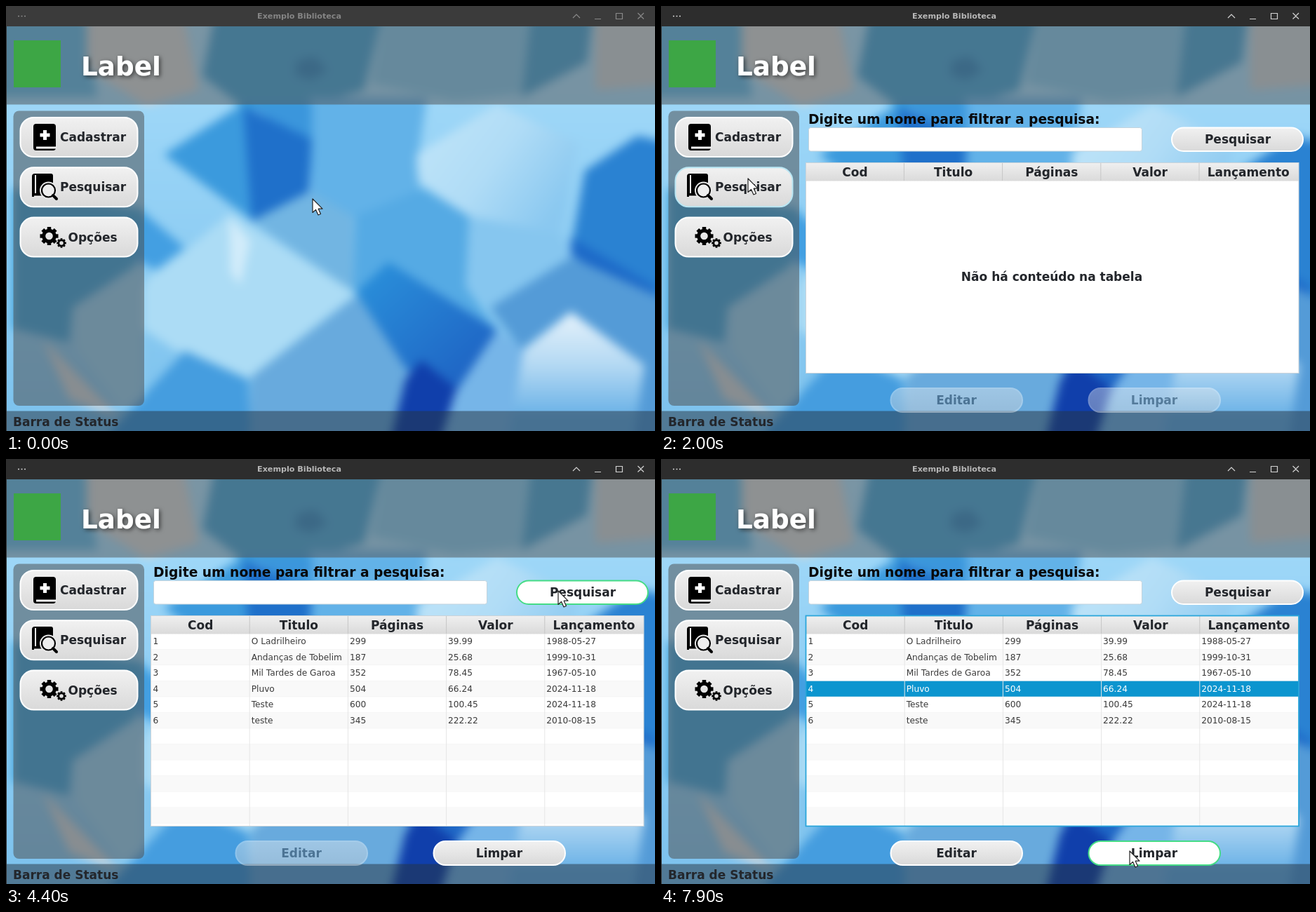
An HTML page for the animation above (8000 ms loop, 925 by 606 pixels).

```html
<!DOCTYPE html>
<html lang="pt">
<head>
<meta charset="utf-8">
<title>Exemplo Biblioteca</title>
<style>
html, body { margin: 0; width: 100%; height: 100%; overflow: hidden; background: #333; }
svg { display: block; width: 925px; height: 606px; }
text { font-family: "DejaVu Sans", sans-serif; fill: #23262b; }
.b { font-weight: bold; font-size: 17px; }
.mid { text-anchor: middle; }
.cell { font-size: 12.2px; fill: #3a3a3a; }
.btn rect { fill: url(#face); stroke: #fff; stroke-width: 2; }
.btn.focus rect { stroke: #b9e6f3; }
.btn.hover rect { fill: #fff; stroke: #45dc86; }
.btn.off { opacity: .4; }
.row.sel rect { fill: #0c95cf; }
.row.sel text { fill: #fff; }
</style>
</head>
<body>
<svg id="stage" viewBox="0 0 925 606">
  <defs>
    <linearGradient id="face" x2="0" y2="1"><stop stop-color="#f1f1f1"/><stop offset="1" stop-color="#d9d9d9"/></linearGradient>
    <linearGradient id="head" x2="0" y2="1"><stop stop-color="#efefef"/><stop offset="1" stop-color="#dadada"/></linearGradient>
    <linearGradient id="sky" x2="0" y2="1"><stop stop-color="#a9defb"/><stop offset="1" stop-color="#78bfec"/></linearGradient>
    <linearGradient id="deep" x2="1" y2="1"><stop stop-color="#2b93dc"/><stop offset="1" stop-color="#1c5cc0"/></linearGradient>
    <linearGradient id="pale" x2="0" y2="1"><stop stop-color="#e6f2fb"/><stop offset=".35" stop-color="#b4d9f3"/><stop offset=".7" stop-color="#68b0e6"/></linearGradient>
    <linearGradient id="ice" y2=".6"><stop stop-color="#c2e6f9"/><stop offset=".55" stop-color="#b0dcf6"/><stop offset="1" stop-color="#8ac8f0"/></linearGradient>
    <filter id="soft" filterUnits="userSpaceOnUse" x="-40" y="-20" width="1005" height="670" color-interpolation-filters="sRGB">
      <feGaussianBlur stdDeviation="7"/>
    </filter>
    <filter id="shade" x="-20%" y="-30%" width="140%" height="170%"><feDropShadow dx="2" dy="2" stdDeviation="3" flood-opacity=".6"/></filter>
    <clipPath id="body"><rect x="1" y="29" width="924" height="577"/></clipPath>
    <clipPath id="grid"><rect x="207" y="223" width="702" height="300"/></clipPath>
  </defs>

  <rect width="925" height="606" fill="#333"/>
  <g clip-path="url(#body)">
    <g filter="url(#soft)">
      <rect x="-40" y="-20" width="1005" height="670" fill="url(#sky)"/>
      <path fill="#58b4e4" d="M-40 0H110L130 130H-40Z"/>
      <path fill="#cdd3d6" d="M115 0H250L275 120L200 142L115 90Z"/>
      <path fill="#3b9fd4" d="M300 0H540L510 120L430 142L345 150L280 100Z"/>
      <path fill="#2882bd" d="M415 78L440 72L458 92L435 106L412 98Z"/>
      <path fill="#7cc4ea" d="M540 0H750L735 125L640 135L520 110Z"/>
      <path fill="#3f9fd2" d="M750 0H838L828 80L735 130Z"/>
      <path fill="#c4cfd5" d="M840 0H965V110L840 120Z"/>
      <path fill="#62b2e8" d="M432 130H600L585 230L600 320L490 300L435 265Z"/>
      <path fill="#3b9add" d="M225 212L340 138L350 305Z"/>
      <path fill="#3b96dc" d="M335 138H436V195Z"/>
      <path fill="#1f70ca" d="M338 143L436 190L432 265L350 307Z"/>
      <path fill="url(#ice)" d="M585 212L700 140L815 195L790 325L660 300L588 250Z"/>
      <path fill="#2a82d2" d="M825 235L900 185L965 200V440L805 348Z"/>
      <path fill="#1c69c8" d="M805 330L925 400V430L805 355Z"/>
      <path fill="#72b5e2" d="M350 307L435 265L495 300L495 408Z"/>
      <path fill="#55aae4" d="M497 300L595 260L660 300L655 400L700 462L545 365L495 410Z"/>
      <path fill="#86c6ef" d="M660 300L790 325L805 355L690 430L655 400Z"/>
      <path fill="#acdcf5" d="M320 295L500 410L345 532L240 490L180 450L200 390L260 345Z"/>
      <path fill="#d2ecfa" d="M318 300L348 335L334 398L320 380Z"/>
      <path fill="#439fe2" d="M185 285L255 345L215 376L180 360Z"/>
      <path fill="#459ddf" d="M150 606L255 492L345 532L350 650H140Z"/>
      <path fill="#68aadd" d="M350 528L500 413L572 490L560 650H345Z"/>
      <path fill="url(#deep)" d="M498 408L545 365L700 462L645 550L572 520Z"/>
      <path fill="#103fab" d="M592 505L650 552L605 650H540L570 530Z"/>
      <path fill="#549bd7" d="M690 430L805 358L965 430V650H890L910 512L805 435L735 490Z"/>
      <path fill="#76b5e8" d="M640 552L700 462L738 490L710 650H610Z"/>
      <path fill="url(#pale)" d="M738 490L805 437L910 512L890 650H710Z"/>
      <path fill="#3ba0d8" d="M10 260L195 290L185 370L95 430L90 480L10 460Z"/>
      <path fill="#8fcbee" d="M95 430L195 370V560L165 580L100 490Z"/>
      <path fill="#c8d2d9" d="M52 475L165 590L90 560Z"/>
    </g>
    <rect y="29" width="925" height="111.500" fill="#505050" opacity=".5"/>
    <rect y="577.500" width="925" height="29" fill="#263440" opacity=".5"/>
    <rect x="10.500" y="149.500" width="186.500" height="420.500" rx="8" fill="#4a4a4a" opacity=".5"/>
  </g>

  <g id="bar">
    <rect id="barBg" width="925" height="29"/>
    <text id="barText" class="mid" x="418" y="18" font-weight="bold" font-size="11.150">Exemplo Biblioteca</text>
    <g id="barIcons" fill="none" stroke-width="1.200">
      <path d="M808 17L813 12L818 17M839 18.500H848M869.500 10.500H878.500V18.500H869.500ZM900.500 10L909 18.500M909 10L900.500 18.500"/>
      <path d="M17 14.500H28" stroke-width="1.500" stroke-dasharray="2 2.500"/>
    </g>
  </g>

  <rect x="11" y="49" width="67" height="67" fill="#3da645"/>
  <text x="107" y="99" font-weight="bold" font-size="37.300" style="fill:#fff" filter="url(#shade)">Label</text>
  <text class="b" x="10" y="598.500">Barra de Status</text>

  <g id="menu"></g>
  <g id="icons">
    <rect x="39" y="168" width="32" height="38" rx="4"/>
    <path d="M55.500 177V191M48.500 184H62.500" stroke="#fff" stroke-width="5"/>
    <path d="M43 202H72" stroke="#f2f2f2" stroke-width="3"/>
    <path d="M41 239H64Q67 239 67 242V272H37V243Q37 239 41 239Z"/>
    <path d="M42 241V267M40 271.500H56" stroke="#eee" stroke-width="2"/>
    <circle cx="60.500" cy="263" r="9.500" fill="#e8e8e8" stroke="#e8e8e8" stroke-width="6"/>
    <circle cx="60.500" cy="263" r="9.500" fill="#eee" stroke="#000" stroke-width="2.200"/>
    <path d="M67 270L72 275" stroke="#000" stroke-width="4" stroke-linecap="round"/>
    <g id="gears" fill="none" stroke="#000"></g>
  </g>

  <g id="page">
    <text class="b" x="210" y="167.500" style="font-size:18.700px;fill:#08090b">Digite um nome para filtrar a pesquisa:</text>
    <rect x="210.500" y="173.500" width="475" height="33.500" rx="3" fill="#fff" stroke="#c3d3dd"/>
    <g id="tools"></g>
    <rect x="207" y="223.500" width="702" height="300" fill="#fff"/>
    <g clip-path="url(#grid)">
      <g id="rows"></g>
      <rect x="207" y="224" width="702" height="25.500" fill="url(#head)"/>
      <g id="heads"></g>
    </g>
    <text id="empty" class="b mid" x="557" y="392">Não há conteúdo na tabela</text>
    <rect id="frame" x="206.500" y="223.500" width="702.500" height="300" fill="none"/>
  </g>

  <path id="mouse" d="M0 0V19.500L4.500 15.500L8 23L11.500 21.500L8.200 14.200H14Z" fill="#fff" stroke="#222" stroke-width="1.200" stroke-linejoin="round"/>
</svg>

<script>
const LOOP = 8000;
const $ = id => document.getElementById(id);

function add(parent, tag, attrs, text) {
  const el = document.createElementNS("http://www.w3.org/2000/svg", tag);
  for (const k in attrs) el.setAttribute(k, attrs[k]);
  if (text) el.textContent = text;
  parent.appendChild(el);
  return el;
}

function button(parent, x, y, w, h, rx, label, tx, ty, anchor) {
  const g = add(parent, "g", { class: "btn" });
  add(g, "rect", { x, y, width: w, height: h, rx });
  add(g, "text", { class: "b " + anchor, x: tx, y: ty }, label);
  return g;
}

const menu = [["Cadastrar", 77], ["Pesquisar", 77], ["Opções", 88.5]].map(([name, tx], i) =>
  button($("menu"), 20.5, 159 + i * 71.3, 167, 56, 19, name, tx, 193 + i * 71.3, ""));
const find = button($("tools"), 728, 173.5, 187, 33.5, 17, "Pesquisar", 822, 195.5, "mid");
const edit = button($("tools"), 327.5, 545, 187.5, 34, 17, "Editar", 421, 568, "mid");
const clear = button($("tools"), 609.5, 545, 187.5, 34, 17, "Limpar", 703, 568, "mid");

function gear(cx, cy, r, w) {
  const g = add($("gears"), "g", { transform: `translate(${cx} ${cy})` });
  add(g, "circle", { r: r * .6, "stroke-width": w });
  for (let a = 0; a < 360; a += 45)
    add(g, "path", { d: `M0 ${-r * .7}V${-r}`, "stroke-width": r * .42, transform: `rotate(${a})` });
}
gear(61.5, 328, 13, 5);
gear(79, 338, 6.8, 2.6);

// Table
const COL = 140.2, ROW = 22.55, TOP = 249;
const heads = ["Cod", "Titulo", "Páginas", "Valor", "Lançamento"];
const books = [
  ["O Ladrilheiro", "299", "39.99", "1988-05-27"],
  ["Andanças de Tobelim", "187", "25.68", "1999-10-31"],
  ["Mil Tardes de Garoa", "352", "78.45", "1967-05-10"],
  ["Pluvo", "504", "66.24", "2024-11-18"],
  ["Teste", "600", "100.45", "2024-11-18"],
  ["teste", "345", "222.22", "2010-08-15"]
];
heads.forEach((name, i) => {
  add($("heads"), "text", { class: "b mid", x: 277.2 + i * COL, y: 243 }, name);
  if (i) add($("heads"), "path", { d: `M${207 + i * COL} 224V249`, stroke: "#c6c6c6" });
});
const rows = [];
for (let i = 0; i < 13; i++) {
  const y = TOP + i * ROW, g = add($("rows"), "g", { class: "row" });
  add(g, "rect", { x: 207, y, width: 702, height: ROW, fill: i % 2 ? "#f9f9f9" : "#fff" });
  add(g, "path", { d: `M207 ${y + ROW}H909`, stroke: "#ededed", "stroke-width": .8 });
  if (books[i]) [i + 1, ...books[i]].forEach((v, c) =>
    add(g, "text", { class: "cell", x: 209.5 + c * COL, y: y + 15 }, String(v)));
  rows.push(g);
}
for (let i = 1; i < 5; i++)
  add($("rows"), "path", { d: `M${207 + i * COL} 249V523`, stroke: "#e6e6e6" });

// Pointer keys: time, x, y
const path = [
  [100, 437, 275], [300, 330, 240], [500, 120, 192], [600, 98, 205], [700, 88, 270],
  [800, 84, 340], [900, 82, 385], [1000, 82, 351], [1100, 80, 318], [1200, 78, 262],
  [1300, 77, 222], [1400, 104, 234], [1500, 124, 246], [2200, 124, 246], [2500, 260, 300],
  [2700, 390, 298], [2900, 498, 266], [3100, 706, 200], [3300, 768, 192], [3600, 787, 188],
  [4600, 787, 188], [4900, 690, 225], [5200, 470, 288], [5400, 434, 300], [5600, 438, 318],
  [5800, 441, 333], [6800, 441, 333], [7000, 441, 348], [7500, 441, 348], [7700, 580, 478],
  [7800, 645, 543], [7900, 668, 559]
];

function pointer(t) {
  const n = path.findIndex(p => p[0] >= t);
  if (n < 1) return path[n < 0 ? path.length - 1 : 0].slice(1);
  const [a, b] = [path[n - 1], path[n]], k = (t - a[0]) / (b[0] - a[0]);
  return [a[1] + (b[1] - a[1]) * k, a[2] + (b[2] - a[2]) * k];
}

const show = (el, on) => el.style.display = on ? "" : "none";
const flag = (el, name, on) => el.classList.toggle(name, on);

function draw(ms) {
  const t = Math.floor(ms / 100) * 100; // the screen refreshes ten times a second
  const within = (a, b) => t >= a && t < b;
  const active = t >= 1700, filled = t >= 4400, picked = t >= 5400;

  $("barBg").setAttribute("fill", active ? "#2d2d2d" : "#3b3b3b");
  $("barText").style.fill = active ? "#b8b8b8" : "#858585";
  $("barIcons").setAttribute("stroke", active ? "#d2d2d2" : "#898989");

  flag(menu[0], "hover", within(500, 700));
  flag(menu[1], "hover", within(700, 800) || within(1200, 1800));
  flag(menu[2], "hover", within(800, 900) || within(1000, 1200));
  flag(menu[1], "focus", within(1800, 4000));
  flag(find, "hover", within(3200, 4800));
  flag(clear, "hover", t >= 7800);
  flag(edit, "off", !picked);
  flag(clear, "off", !filled);

  show($("page"), t >= 1800);
  show($("rows"), filled);
  show($("empty"), !filled);
  $("heads").setAttribute("transform", `translate(${t < 2300 ? -.8 : 0} 0)`);
  const sel = picked ? (t < 6200 ? 2 : 3) : -1;
  rows.forEach((r, i) => flag(r, "sel", i === sel));
  $("frame").setAttribute("stroke", picked ? "#2ba6da" : "#c9d3da");
  $("frame").setAttribute("stroke-width", picked ? 1.8 : 1);

  const [x, y] = pointer(t);
  $("mouse").setAttribute("transform", `translate(${x} ${y})`);
}

const start = performance.now();
function tick() {
  draw((performance.now() - start) % LOOP);
  requestAnimationFrame(tick);
}
tick();
</script>
</body>
</html>
```
